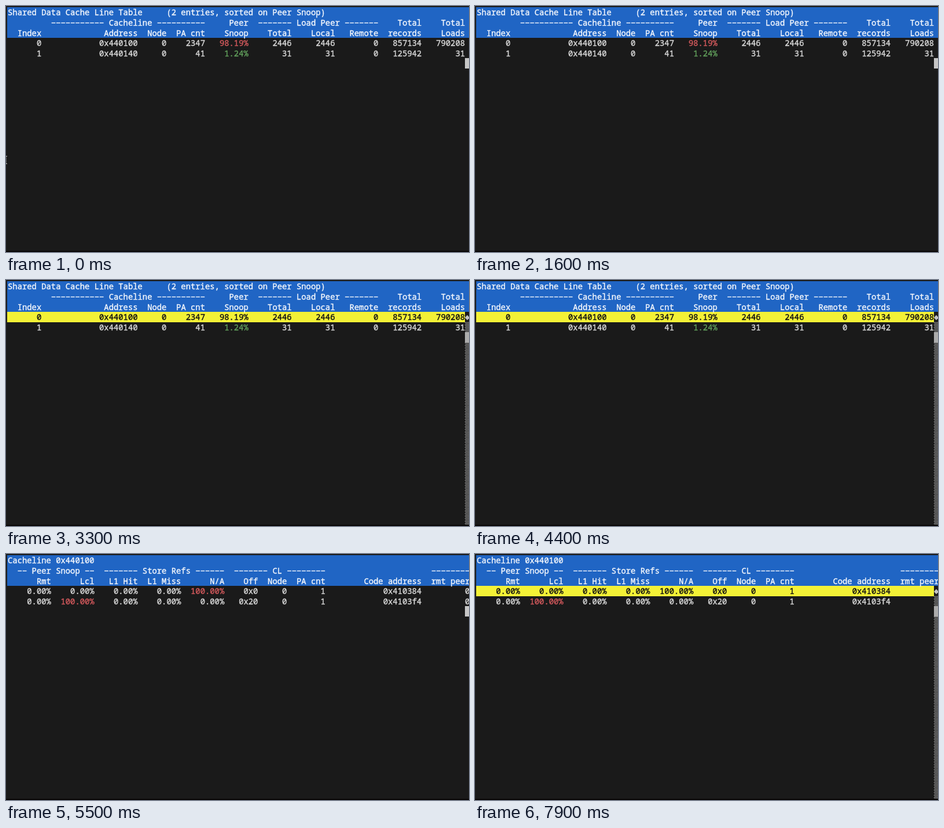
An HTML page with a canvas for the animation above (8 s loop, 800x425 px).

```html
<!DOCTYPE html>
<html lang="en">
<head>
<meta charset="utf-8">
<title>Cache line report</title>
<style>
html, body { margin: 0; width: 100%; height: 100%; overflow: hidden; background: #1a1a1a; }
canvas { display: block; }
</style>
</head>
<body>
<canvas id="stage" width="800" height="425"></canvas>
<script>
const ctx = document.getElementById('stage').getContext('2d');
const LOOP = 8000, LEFT = 3, TOP = 2.4, CELL = 8.316, LINE = 17.6;
const BG = '#1a1a1a', BLUE = '#2065c4', YELLOW = '#f3f136';
const HEAD = '#f2f6fc', TEXT = '#d8d8d8', RED = '#d2595c', GREEN = '#62a05c';
// Moments when the row is selected, the detail view opens, and its row is selected.
const SELECT = 2800, OPEN = 5200, SELECT_DETAIL = 6200;

const colX = c => LEFT + c * CELL;
const rowY = r => TOP + r * LINE;

// Column ends are measured in terminal cells.
const overview = {
  title: 'Shared Data Cache Line Table     (2 entries, sorted on Peer Snoop)',
  groups: [['----------- Cacheline ----------', 41], ['Peer', 50],
    ['------- Load Peer -------', 77], ['Total', 86], ['Total', 95]],
  ends: [7, 27, 33, 41, 50, 59, 68, 77, 86, 95],
  names: ['Index', 'Address', 'Node', 'PA cnt', 'Snoop', 'Total', 'Local', 'Remote', 'records', 'Loads'],
  rows: [
    ['0', '0x440100', '0', '2347', '98.19%', '2446', '2446', '0', '857134', '790208'],
    ['1', '0x440140', '0', '41', '1.24%', '31', '31', '0', '125942', '31']
  ],
  tints: { '98.19%': RED, '1.24%': GREEN }
};
const detail = {
  title: 'Cacheline 0x440100',
  groups: [['-- Peer Snoop --', 18], ['------- Store Refs ------', 45],
    ['------- CL --------', 66], ['--------', 96]],
  ends: [9, 18, 27, 36, 45, 52, 58, 66, 86, 96],
  names: ['Rmt', 'Lcl', 'L1 Hit', 'L1 Miss', 'N/A', 'Off', 'Node', 'PA cnt', 'Code address', 'rmt peer'],
  rows: [
    ['0.00%', '0.00%', '0.00%', '0.00%', '100.00%', '0x0', '0', '1', '0x410384', '0'],
    ['0.00%', '100.00%', '0.00%', '0.00%', '0.00%', '0x20', '0', '1', '0x4103f4', '0']
  ],
  tints: { '100.00%': RED }
};

function box(color, x, y, w, h) {
  ctx.fillStyle = color;
  ctx.fillRect(x, y, w, h);
}

function fillRows(color, first, end, x, right) {
  const y = Math.round(rowY(first));
  box(color, x, y, right - x, Math.round(rowY(end)) - y);
}

function write(text, endCol, row, color) {
  const start = endCol - text.length;
  const letters = text.replace(/-/g, ' ');
  const baseline = rowY(row) + 13.9;
  ctx.fillStyle = ctx.strokeStyle = color;
  ctx.fillText(letters, colX(start), baseline);
  ctx.strokeText(letters, colX(start), baseline);
  [...text].forEach((ch, i) => {
    if (ch === '-') ctx.fillRect(colX(start + i) + 0.8, rowY(row) + 8.6, 6.8, 1.4);
  });
}

function drawTable(table, selected) {
  fillRows(BLUE, 0, 3, 2, 800);
  if (selected) fillRows(YELLOW, 3, 4, 2, 793);
  write(table.title, table.title.length, 0, HEAD);
  table.groups.forEach(([text, end]) => write(text, end, 1, HEAD));
  table.names.forEach((name, i) => write(name, table.ends[i], 2, HEAD));
  table.rows.forEach((cells, r) => cells.forEach((cell, i) => {
    const color = selected && r === 0 ? '#111' : table.tints[cell] || TEXT;
    write(cell, table.ends[i], 3 + r, color);
  }));
}

function drawScrollbar() {
  const x = 793;
  box(BG, x, rowY(3), 7, 425);
  // Staggered dots, eight rows of four to each terminal cell.
  const stepX = CELL / 4, stepY = LINE / 8;
  for (let i = 0; rowY(4) + i * stepY < 423; i++)
    for (let k = 0; k < 4; k++)
      box('#c0c0c0', x + (k + i % 2 / 2) * stepX, rowY(4) + i * stepY, 1.3, 1.3);
  const cy = rowY(3) + LINE / 2 + 1;
  ctx.fillStyle = '#c4c4c4';
  ctx.beginPath();
  ctx.moveTo(797, cy - 4.5);
  ctx.lineTo(801, cy);
  ctx.lineTo(797, cy + 4.5);
  ctx.lineTo(793, cy);
  ctx.fill();
}

function drawPointer() {
  box('#c8c8c8', 0, 259, 2, 1);
  box('#c8c8c8', 0, 272, 2, 1);
  box('#888', 0, 260, 0.6, 12);
}

function draw(t) {
  const inDetail = t >= OPEN;
  const selected = t >= (inDetail ? SELECT_DETAIL : SELECT);
  box(BG, 0, 0, 800, 425);
  ctx.font = '13.86px "Noto Sans Mono", "DejaVu Sans Mono", monospace';
  ctx.lineWidth = 0.4;
  drawTable(inDetail ? detail : overview, selected);
  if (selected) drawScrollbar();
  fillRows(selected ? '#acacac' : '#c6c6c6', 5, 6, 793, 800);
  box('#080606', 0, 423, 800, 2);
  if (t < 100) drawPointer();
}

const began = performance.now();
function tick() {
  draw((performance.now() - began) % LOOP);
  requestAnimationFrame(tick);
}
tick();
</script>
</body>
</html>
```
